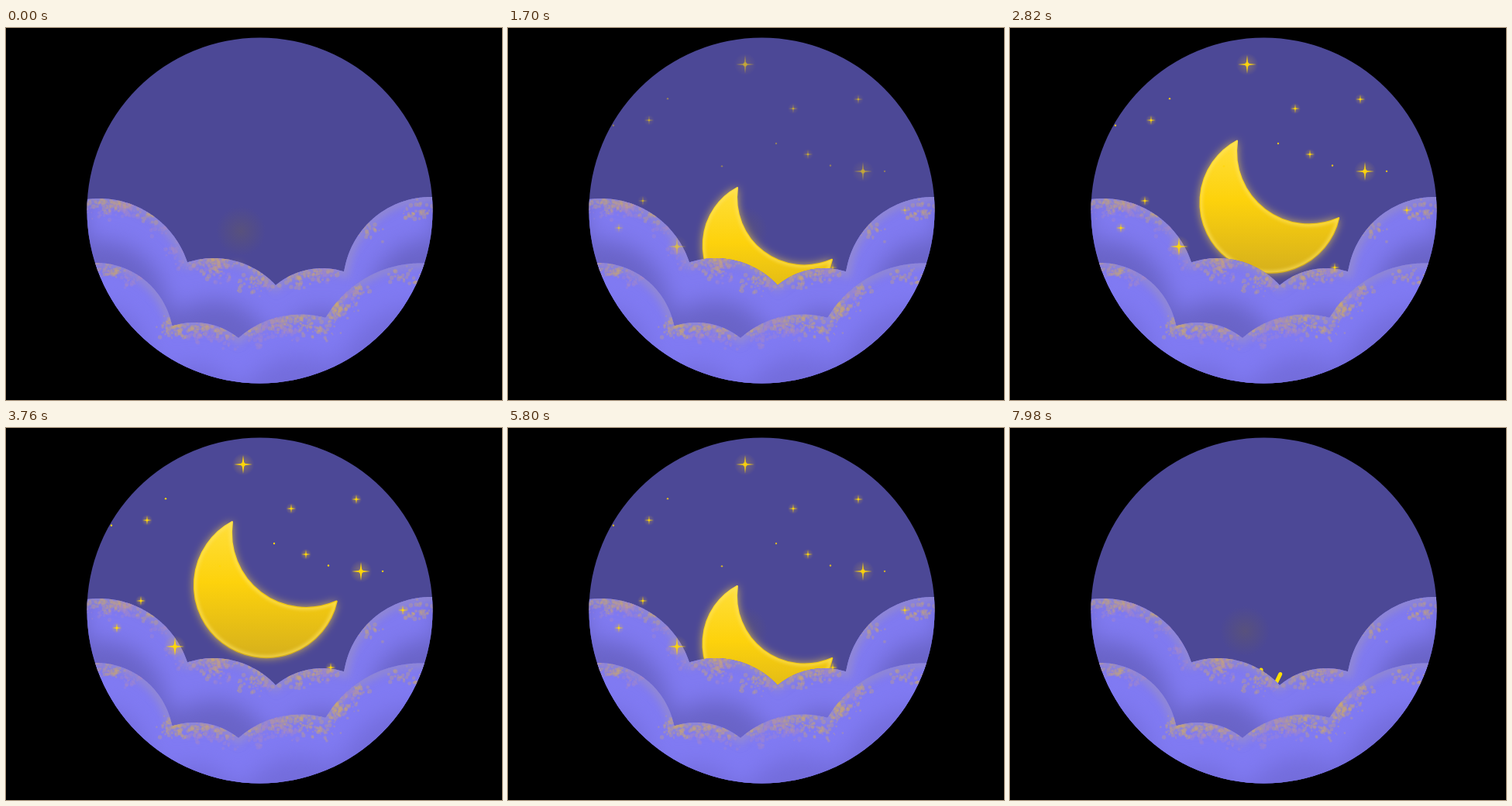
These frames come from a looping animation (640x480 px, 8 s). An HTML page with a canvas:

```html
<!DOCTYPE html>
<html>
<head>
<meta charset="utf-8">
<title>Moonrise</title>
<style>
html, body { margin: 0; width: 100%; height: 100%; overflow: hidden; background: #000; }
canvas { display: block; width: 640px; height: 480px; }
</style>
</head>
<body>
<canvas id="stage" width="640" height="480"></canvas>
<script>
const LOOP = 8000, W = 640, H = 480, TURN = 2 * Math.PI;
const disc = { x: 327.5, y: 235.5, r: 223 };
const ctx = document.getElementById('stage').getContext('2d');

let seed = 11;
const random = () => (seed = seed * 16807 % 2147483647) / 2147483647;
const spread = size => (random() + random() - 1) * size;
const smooth = (from, to, t) => {
  const p = Math.min(1, Math.max(0, (t - from) / (to - from)));
  return p * p * (3 - 2 * p);
};

function fillCircle(g, x, y, r) {
  g.beginPath();
  g.arc(x, y, r, 0, TURN);
  g.fill();
}

function clipDisc(g) {
  g.beginPath();
  g.arc(disc.x, disc.y, disc.r, 0, TURN);
  g.clip();
}

function glow(g, x, y, r, rgb, alpha) {
  const fill = g.createRadialGradient(x, y, 0, x, y, r);
  fill.addColorStop(0, `rgba(${rgb},${alpha})`);
  fill.addColorStop(1, `rgba(${rgb},0)`);
  g.fillStyle = fill;
  g.fillRect(x - r, y - r, 2 * r, 2 * r);
}

// Each cloud bank is a union of round lobes, given as [peak x, peak y, radius].
const backLobes = [[120, 220, 120], [268, 297, 109], [408, 310, 93], [548, 218, 113]];
const frontLobes = [[116, 303, 100], [243, 380, 91], [380, 369.5, 120], [535, 303.5, 142]];

const bankTop = (lobes, x) => Math.min(...lobes.map(([px, py, r]) =>
  Math.abs(x - px) < r ? py + r - Math.sqrt(r * r - (x - px) ** 2) : H));

function paintBank(g, lobes, base, light) {
  const rim = new Path2D();
  for (let x = 100; x <= 556; x++) rim.lineTo(x, bankTop(lobes, x));
  const body = new Path2D(rim);
  body.lineTo(556, H);
  body.lineTo(100, H);

  const band = (color, width, blur, dy) => {
    g.save();
    g.translate(0, dy);
    g.filter = `blur(${blur}px)`;
    g.strokeStyle = color;
    g.lineWidth = width;
    g.stroke(rim);
    g.restore();
  };

  g.save();
  g.fillStyle = base;
  g.fill(body);
  g.clip(body);
  band(light, 66, 14, 22);
  band('rgba(150,140,205,.75)', 14, 5, 0);
  for (let cluster = 0; cluster < 34; cluster++) {
    const cx = 105 + random() * 445, cy = bankTop(lobes, cx) + random() ** 2 * 22;
    g.fillStyle = random() < .65 ? 'rgba(205,170,105,.3)' : 'rgba(165,135,195,.3)';
    for (let i = 0; i < 26; i++) {
      fillCircle(g, cx + spread(22), cy + spread(14), .8 + random() * 2.2);
    }
  }
  g.restore();
}

function paintClouds() {
  const layer = document.createElement('canvas');
  layer.width = W;
  layer.height = H;
  const g = layer.getContext('2d');
  clipDisc(g);
  paintBank(g, backLobes, '#6a64c8', '#807af0');
  paintBank(g, frontLobes, '#746ddc', '#807af2');
  return layer;
}
const clouds = paintClouds();

const moonShape = new Path2D('M-45-83A94.4 94.4 0 1 0 92 21A98 98 0 0 1-45-83Z');

function drawMoon(t) {
  const drop = (t < 4000 ? 96.5 : 144) * (1 - Math.cos(.0006 * (t - 4000)));
  const scale = .985 - .0012 * drop;
  const gold = ctx.createLinearGradient(0, -85, 0, 95);
  gold.addColorStop(0, '#ffdf3c');
  gold.addColorStop(.45, '#fdd20c');
  gold.addColorStop(1, '#d6b01c');
  ctx.save();
  ctx.translate(336, 202 + drop);
  ctx.scale(scale, scale);
  ctx.fillStyle = ctx.strokeStyle = gold;
  ctx.lineJoin = 'round';
  ctx.lineWidth = 2.5;
  ctx.shadowColor = 'rgba(255,215,60,.85)';
  ctx.shadowBlur = 12;
  ctx.fill(moonShape);
  ctx.shadowBlur = 0;
  ctx.stroke(moonShape);
  ctx.clip(moonShape);
  ctx.filter = 'blur(2px)';
  ctx.strokeStyle = 'rgba(255,228,100,.7)';
  ctx.lineWidth = 5;
  ctx.stroke(moonShape);
  ctx.restore();
}

function drawSun(t) {
  ctx.save();
  ctx.translate(324, 369 + (7980 - t) * .07);
  ctx.fillStyle = ctx.strokeStyle = '#ffdf00';
  ctx.lineWidth = 5;
  ctx.lineCap = 'round';
  fillCircle(ctx, 0, 0, 36);
  for (let i = 0; i < 14; i++) {
    ctx.beginPath();
    ctx.moveTo(0, -46);
    ctx.lineTo(0, -57);
    ctx.stroke();
    ctx.rotate(TURN / 14);
  }
  ctx.restore();
}

// The first three sparkles are the large ones.
const sparkles = [[306, 47], [458, 185], [218, 282], [368, 104], [452, 92], [182, 119],
  [387, 163], [174, 223], [143, 258], [512, 235], [419, 309]];
const dots = Array.from({ length: 6 }, (_, i) => [136 + i * 70, 80 + random() * 110]);

function drawSparkle(x, y, r) {
  glow(ctx, x, y, r * 1.2, '230,185,50', .4);
  ctx.fillStyle = '#ffd60a';
  ctx.beginPath();
  for (let i = 0; i < 8; i++) {
    const a = i * TURN / 8, d = i % 2 ? r * .16 : r;
    ctx.lineTo(x + d * Math.cos(a), y + d * Math.sin(a));
  }
  ctx.fill();
  fillCircle(ctx, x, y, r * .22);
}

function drawStars(t) {
  ctx.save();
  ctx.globalAlpha = smooth(300, 3600, t) * (1 - smooth(5000, 7600, t));
  sparkles.forEach(([x, y], i) => drawSparkle(x, y, i < 3 ? 12 : 6));
  for (const [x, y] of dots) fillCircle(ctx, x, y, 1.2);
  ctx.restore();
}

function draw(t) {
  ctx.clearRect(0, 0, W, H);
  ctx.save();
  clipDisc(ctx);
  ctx.fillStyle = '#4c4896';
  ctx.fillRect(0, 0, W, H);
  glow(ctx, 303, 262, 32, '100,90,100', .5);
  if (t < 7300) drawMoon(t);
  if (t > 7600) drawSun(t);
  ctx.restore();
  ctx.drawImage(clouds, 0, 0);
  drawStars(t);
}

function frame() {
  draw(performance.now() % LOOP);
  requestAnimationFrame(frame);
}
frame();
</script>
</body>
</html>
```
